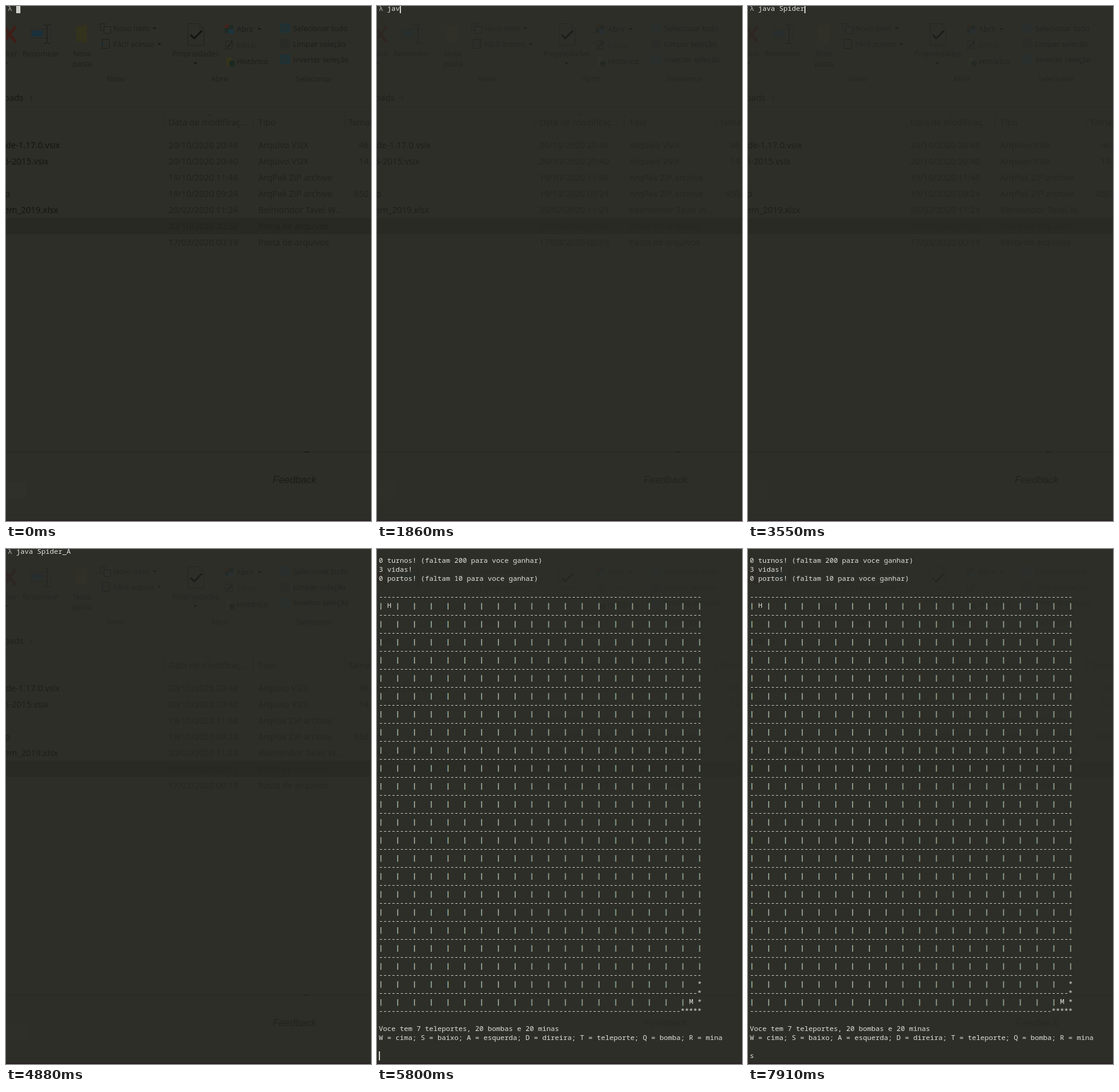
Animation, 609 px wide and 858 px high, one loop 8000 ms. Source, as an HTML page:

```html
<!DOCTYPE html>
<html lang="pt">
<head>
<meta charset="utf-8">
<title>Terminal</title>
<style>
html, body { margin: 0; width: 100%; height: 100%; overflow: hidden; background: #2d2e28; }
#stage { position: absolute; left: 0; top: 0; width: 609px; height: 858px; overflow: hidden; }
svg { position: absolute; left: 0; top: 0; font-family: "Open Sans", "Noto Sans", sans-serif; }
pre { position: absolute; left: 3px; top: -4px; margin: 0; color: #e2e2dc;
  font: 11.667px/15px "Noto Sans Mono", "DejaVu Sans Mono", monospace; }
/* Colour fringes of subpixel-smoothed bars */
pre i { font-style: normal; color: #bcdcb6; text-shadow: -1px 0 #3a5068, 1px 0 #68503a; }
pre u { text-decoration: none; color: #b8b9b6; }
#cursor { position: absolute; height: 15px; background: #d0d0cb; }
#edge { position: absolute; left: 0; top: 856px; width: 609px; height: 2px; background: #2a2025; }
</style>
</head>
<body>
<div id="stage">
  <svg id="ghost" width="609" height="858"><g id="ribbon"></g><g id="list"></g></svg>
  <div id="edge"></div>
  <pre id="screen"></pre>
  <div id="cursor"></div>
</div>
<script>
const $ = id => document.getElementById(id);
const LOOP = 8000, CW = 7, LH = 15;

// Faint file window behind the terminal
const text = (x, y, s, fill = '#1d1e1a', size = 12.5, more = '') =>
  `<text x="${x}" y="${y}" fill="${fill}" font-size="${size}" ${more}>${s}</text>`;
const path = (d, stroke, width = 1, fill = 'none') =>
  `<path d="${d}" stroke="${stroke}" stroke-width="${width}" fill="${fill}"/>`;
const box = (x, y, w, h, fill, stroke = 'none') =>
  `<rect x="${x}" y="${y}" width="${w}" height="${h}" fill="${fill}" stroke="${stroke}"/>`;
const caret = (x, y) => path(`M${x - 3} ${y - 1}h6l-3 3z`, 'none', 0, '#151612');
const mid = 'text-anchor="middle"', end = 'text-anchor="end"';
const DIM = '#20211d', PALE = '#21221d', DARK = '#131410';

function drawGhost() {
  const ribbon = [
    path('M-4 34L16 60M16 34L-4 60', '#401d17', 5),
    text(19, 84, 'Excluir', DIM, 12.5, end), caret(0, 95),
    box(41.5, 38.5, 34, 15, 'none', '#24282a'), box(43, 41, 18, 10, '#1a303c'),
    path('M63 31.500h4l1.500 1.500l1.500-1.500h4M68.500 32v29M63 62.500h4l1.500-1.500l1.500 1.500h4', '#1b1c19'),
    text(58, 84, 'Renomear', DIM, 12.5, mid),
    path('M117 34h11v-3h7v28l-8 3v-3h-10z', 'none', 0, '#33321c'),
    text(127, 84, 'Nova', DIM, 12.5, mid), text(127, 101, 'pasta', DIM, 12.5, mid),
    box(157.5, 29.5, 9, 11, 'none', '#22231f'), box(163.5, 34.5, 11, 11, '#30302a', '#1f201c'),
    box(160.5, 55.5, 12, 15, 'none', '#1e1f1b'), path('M158 64h6', '#1c303a', 2),
    text(179, 42, 'Novo item', DIM), caret(248, 37),
    text(179, 68, 'Fácil acesso', DIM), caret(256, 63),
    text(183, 126, 'Novo', PALE, 12.5, mid),
    path('M303.500 29.500h20l7 7v29h-27zM323.500 29.500v7h7', '#22231f'),
    path('M308 48l6 6l13-13', DARK, 3),
    text(316.5, 84, 'Propriedades', DIM, 12.5, mid), caret(316, 95),
    box(365, 32, 14, 13, '#1d2a25'), box(365, 31, 7, 6, '#40231b'), box(371, 39, 9, 7, '#1c3440'),
    text(385, 43, 'Abrir'), caret(423, 38),
    box(366.5, 58.5, 11, 13, 'none', '#22231f'), path('M369 69l9-10', '#21221d', 2),
    text(385, 70, 'Editar', '#262722'),
    box(368, 86, 8, 14, '#353419'), '<circle cx="377" cy="96" r="5" fill="#1b2820"/>',
    text(385, 97, 'Histórico'),
    text(357, 126, 'Abrir', PALE, 12.5, mid),
    text(514, 126, 'Selecionar', PALE, 12.5, mid)
  ];
  ['Selecionar tudo', 'Limpar seleção', 'Inverter seleção'].forEach((s, i) => {
    const y = 29 + i * 26;
    ribbon.push(box(457, y, 17, 16, i == 1 ? '#292b27' : '#1f3235'),
      path(`M457 ${y + 8}h17M465.500 ${y}v16`, '#2a2c27'), text(479, y + 13, s));
  });

  const list = [
    text(29, 158, 'Downloads', '#171814', 14.3, end), path('M40 150l4 4l-4 4', '#1a1b17'),
    path('M0 167.500h609M263.500 180v28M412.500 180v28M565.500 180v28', '#292a25'),
    path('M334 179l4 4l4-4', '#20211d'),
    text(271, 199, 'Data de modificaç...', PALE, 14.3),
    text(421, 199, 'Tipo', PALE, 14.3), text(571, 199, 'Tamanho', PALE, 14.3),
    box(0, 353, 609, 27, '#292924')
  ];
  const rows = [
    ['code-1.17.0.vsix', 90, '20/10/2020 20:48', 'Arquivo VSIX', '46.'],
    ['2015-2015.vsix', 71, '20/10/2020 20:40', 'Arquivo VSIX', '14.'],
    ['', 0, '19/10/2020 11:48', 'ArqPak ZIP archive', ''],
    ['zip', 7, '19/10/2020 09:24', 'ArqPak ZIP archive', '650.'],
    ['em_2019.xlsx', 87, '20/02/2020 11:24', 'Belmondor Tavel W...', ''],
    ['', 0, '20/10/2020 20:52', 'Pasta de arquivos', ''],
    ['', 0, '17/03/2020 00:19', 'Pasta de arquivos', '']
  ];
  rows.forEach(([name, right, date, kind, size], i) => {
    const y = 237 + i * 27;
    list.push(text(right, y, name, DARK, 14.3, end), text(271, y, date, PALE, 14.3),
      text(421, y, kind, PALE, 14.3), text(609, y, size, PALE, 14.3, end));
  });
  list.push(path('M0 743.500h609', '#272822', 2), path('M498 743h7', '#1c1d19', 2),
    box(0, 792, 34, 28, '#30302a'),
    text(445, 795, 'Feedback', '#1b1c18', 16.6, 'font-style="italic" font-family="Liberation Sans, sans-serif"'));
  $('ribbon').innerHTML = ribbon.join('');
  $('list').innerHTML = list.join('');
}

// Terminal contents
const COMMAND = 'java Spider_Arena';
const KEYS = [1620, 1690, 1860, 2010, 2240, 2780, 3010, 3240, 3320, 3400, 3550,
  3950, 4330, 5030, 5110, 5260, 5410];
const HIDDEN = [[1160, 1620], [2700, 2780], [4880, 5030], [6350, 6890], [7910, 8000]];
const FOCUS = 610, ENTER = 5570, REPORT = 5720, BOARD = 5800, MOVE = 7360;

function makeBoard(cols, rows) {
  const rule = '-'.repeat(cols * 4 + 1), cells = '|   '.repeat(cols) + '|';
  const lines = [rule];
  for (let r = 0; r < rows; r++) lines.push(cells, rule);
  const put = (row, col, s) =>
    lines[row] = lines[row].slice(0, col) + s + lines[row].slice(col + s.length);
  const last = cols * 4, low = rows * 2;
  put(1, 2, 'H');
  put(low - 1, last - 2, 'M');
  for (let r = low - 3; r < low; r++) put(r, last, '*');
  put(low, last - 4, '*****');
  return lines.join('\n').replace(/\|/g, '<i>|</i>');
}

const board = `
0 turnos! (faltam 200 para voce ganhar)
3 vidas!
0 portos! (faltam 10 para voce ganhar)

${makeBoard(19, 23)}

Voce tem 7 teleportes, 20 bombas e 20 minas
W = cima; S = baixo; A = esquerda; D = direira; T = teleporte; Q = bomba; R = mina

`;
const report = '\n\n\ni: 0 j: 0 u: 22 v: 18 sqrt de: 808.0 e fim de: 28.42534080710379';

function state(t) {
  if (t >= BOARD) {
    const moved = t >= MOVE;
    return { html: board + (moved ? 's' : ''), row: 56, col: moved ? 1 : 0 };
  }
  const typed = KEYS.filter(k => t >= k).length;
  const line = '<u>λ</u> ' + COMMAND.slice(0, typed);
  if (t >= REPORT) return { html: line + report, row: 5, col: 0 };
  if (t >= ENTER) return { html: line, row: 1, col: 0 };
  return { html: line, row: 0, col: 2 + typed };
}

let shown;
function frame(now) {
  const t = now % LOOP, s = state(t), c = $('cursor').style;
  if (s.html !== shown) $('screen').innerHTML = shown = s.html;
  c.left = 3 + s.col * CW + 'px';
  c.top = s.row * LH - 3 + 'px';
  c.width = (t < FOCUS ? CW : 2) + 'px';
  c.visibility = HIDDEN.some(([a, b]) => t >= a && t < b) ? 'hidden' : 'visible';
  $('ghost').style.opacity = t < FOCUS ? 1 : t < BOARD ? 0.6 : 0.25;
  $('ribbon').style.filter = t < FOCUS ? 'none' : 'saturate(.4)';
  requestAnimationFrame(frame);
}

drawGhost();
requestAnimationFrame(frame);
</script>
</body>
</html>
```
